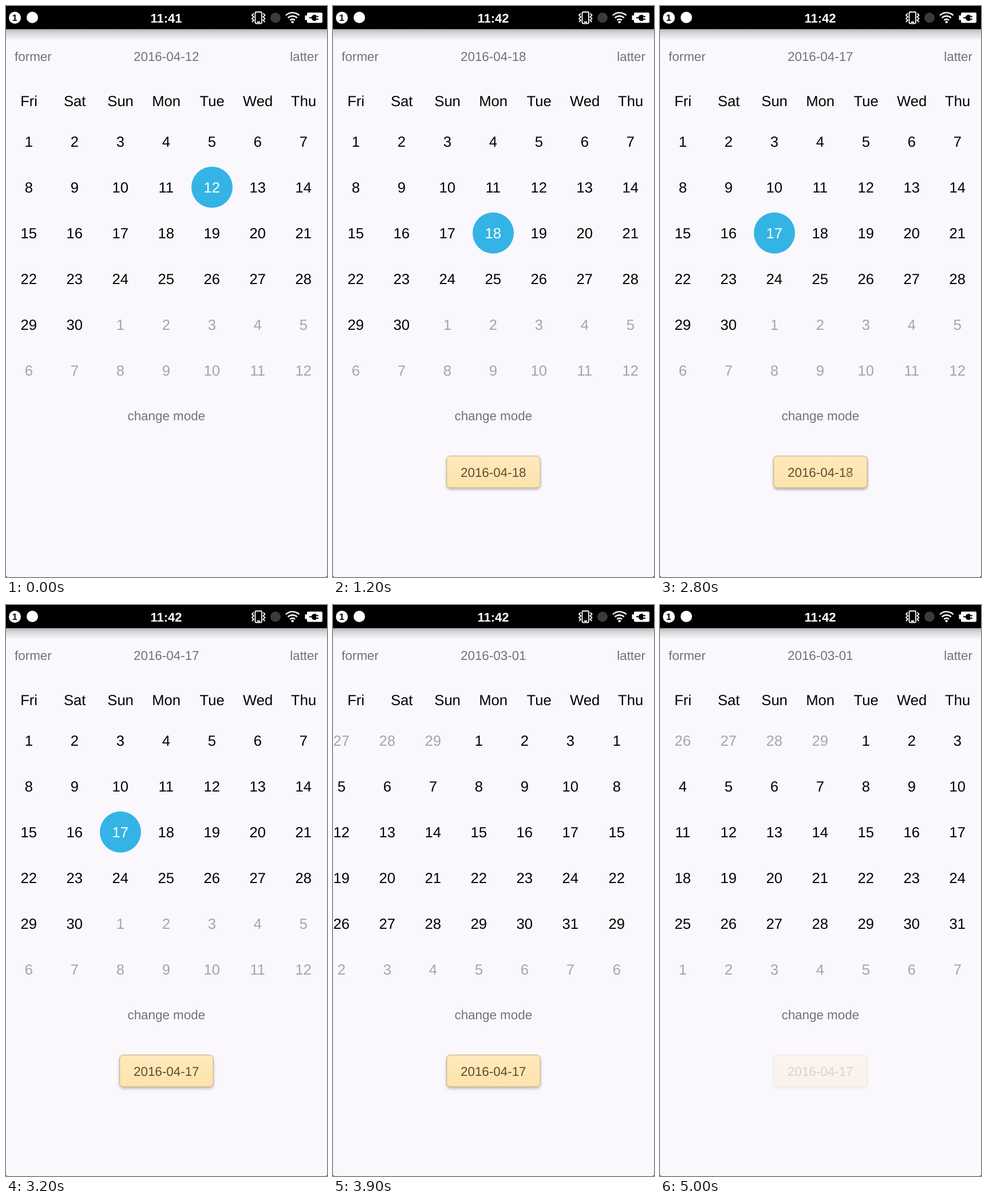
An HTML page for the animation above (5100 ms loop, 561 px wide and 998 px high).

```html
<!DOCTYPE html>
<html lang="en">
<head>
<meta charset="utf-8">
<title>Calendar</title>
<style>
  html, body { margin: 0; width: 100%; height: 100%; overflow: hidden; background: #000; }
  svg { display: block; width: 100vw; height: 100vh; }
  text { font-family: "Liberation Sans", Arial, sans-serif; text-anchor: middle; text-rendering: geometricPrecision; }
  .label { font-size: 22.4px; fill: #737175; }
  .cell { font-size: 25.6px; fill: #000; }
  .cell.other { fill: #a6a4a7; }
  .cell.picked { fill: #fff; }
  .start { text-anchor: start; }
  .end { text-anchor: end; }
  .clock { font-size: 22px; font-weight: bold; fill: #fff; }
  .badge { font-size: 16px; font-weight: bold; fill: #000; }
  .toast rect { fill: url(#cream); stroke: #c2aa7c; filter: drop-shadow(0 3px 2.5px rgba(0, 0, 0, .24)); }
  .toast text { font-size: 22.4px; fill: #5f4a2f; }
</style>
</head>
<body>
<svg viewBox="0 0 561 998" preserveAspectRatio="none">
  <defs>
    <linearGradient id="cream" x2="0" y2="1">
      <stop stop-color="#ffe9bd"/><stop offset="1" stop-color="#fde3aa"/>
    </linearGradient>
    <linearGradient id="shade" x2="0" y2="1">
      <stop stop-opacity=".27"/><stop offset=".4" stop-opacity=".13"/><stop offset="1" stop-opacity="0"/>
    </linearGradient>
  </defs>
  <rect y="-10" width="561" height="1008" rx="3" fill="#faf8fc"/>
  <rect y="40" width="561" height="20" fill="url(#shade)"/>

  <!-- status bar -->
  <rect width="561" height="40.5"/>
  <circle cx="15.5" cy="20.5" r="10.5" fill="#fff"/>
  <text class="badge" x="15.2" y="26.2">1</text>
  <circle cx="46" cy="20" r="10" fill="#fff"/>
  <text class="clock" id="clock" x="280" y="28.5"></text>
  <g fill="none" stroke="#fff" stroke-width="1.8">
    <rect x="435.5" y="10.5" width="11.5" height="20" rx="1.5"/>
    <path d="M439 28h5M433 13l-3 3 3 3-3 3 3 3-3 3M449.5 13l3 3-3 3 3 3-3 3 3 3"/>
  </g>
  <circle cx="471" cy="20.5" r="9" fill="#3b3b3b"/>
  <path fill="none" stroke="#fff" stroke-width="2.4"
    d="M489 16.5a16.5 16.5 0 0 1 23.500 0M492.700 20.800a11.300 11.300 0 0 1 16 0M496.400 24.800a6.200 6.200 0 0 1 8.600 0"/>
  <circle cx="500.7" cy="28" r="2.2" fill="#fff"/>
  <path fill="#fff" d="M528 11.500h23a2 2 0 0 1 2 2v14a2 2 0 0 1-2 2h-23a2 2 0 0 1-2-2v-3h-3.500v-8h3.500v-3a2 2 0 0 1 2-2z"/>
  <path d="M530 19.500h4q1-4 5-4h3v2h4v2h-4v2.500h4v2h-4v2h-3q-4 0-5-4.500h-4z"/>

  <text class="label start" x="15" y="96">former</text>
  <text class="label" id="title" x="280.3" y="96"></text>
  <text class="label end" x="546" y="96">latter</text>
  <g id="week"></g>
  <g id="march"></g>
  <g id="april"><circle id="dot" r="36" fill="#34b4e5"/></g>
  <text class="label" x="280.3" y="724.3">change mode</text>
  <g id="toasts"></g>
</svg>
<script>
const LOOP = 5100, STEP = 100, WIDTH = 561;
const $ = id => document.getElementById(id);
const clamp = v => Math.max(0, Math.min(1, v));

function add(parent, tag, attrs, text = '') {
  const el = document.createElementNS('http://www.w3.org/2000/svg', tag);
  for (const key in attrs) el.setAttribute(key, attrs[key]);
  el.textContent = text;
  return parent.appendChild(el);
}

const colX = i => 39.8 + 80 * (i % 7);
const rowY = i => 246.1 + 80 * Math.floor(i / 7);

'Fri Sat Sun Mon Tue Wed Thu'.split(' ').forEach((day, i) =>
  add($('week'), 'text', { class: 'cell', x: colX(i) + .3, y: 175 }, day));

// Six weeks of a 2016 month, starting on a Friday
function buildMonth(group, month, firstDay) {
  return Array.from({ length: 42 }, (_, i) => {
    const date = new Date(2016, month, firstDay + i);
    const type = date.getMonth() === month ? 'cell' : 'cell other';
    return add(group, 'text', { class: type, x: colX(i), y: rowY(i) }, date.getDate());
  });
}
buildMonth($('march'), 2, -3);
const aprilCells = buildMonth($('april'), 3, 1);

function buildToast(day, show, hide, outTime) {
  const el = add($('toasts'), 'g', { class: 'toast' });
  add(el, 'rect', { x: 198.7, y: 786.5, width: 163.5, height: 55.5, rx: 6 });
  add(el, 'text', { x: 280.3, y: 823 }, '2016-04-' + day);
  return { el, show, hide, outTime };
}
const toasts = [buildToast(18, 850, 2750, 400), buildToast(17, 2750, 4680, 360)];

function toastAlpha(t, { show, hide, outTime }) {
  const enter = 1 - (1 - clamp((t - show) / 400)) ** 2;
  const leave = 1 - clamp((t - hide) / outTime) ** 2;
  return enter * leave;
}

// Swipe to the previous month: slow start, soft settle
function swipe(t) {
  if (t < 3600) return 0;
  return Math.round(WIDTH / (1 + Math.exp((3800 - t) / 68)));
}

function render(t) {
  const day = t < 300 ? 12 : t < 2000 ? 18 : 17;
  $('clock').textContent = t < 300 ? '11:41' : '11:42';
  $('title').textContent = t < 3800 ? '2016-04-' + day : '2016-03-01';

  aprilCells.forEach((cell, i) => cell.classList.toggle('picked', i + 1 === day));
  $('dot').setAttribute('cx', colX(day - 1) + .2);
  $('dot').setAttribute('cy', rowY(day - 1) - 9.4);

  const x = swipe(t);
  $('april').setAttribute('transform', `translate(${x})`);
  $('march').setAttribute('transform', `translate(${x - WIDTH})`);
  for (const toast of toasts) toast.el.setAttribute('opacity', toastAlpha(t, toast));
}

const begin = performance.now();
function tick() {
  const t = (performance.now() - begin) % LOOP;
  render(Math.floor(t / STEP) * STEP);
  requestAnimationFrame(tick);
}
tick();
</script>
</body>
</html>
```
